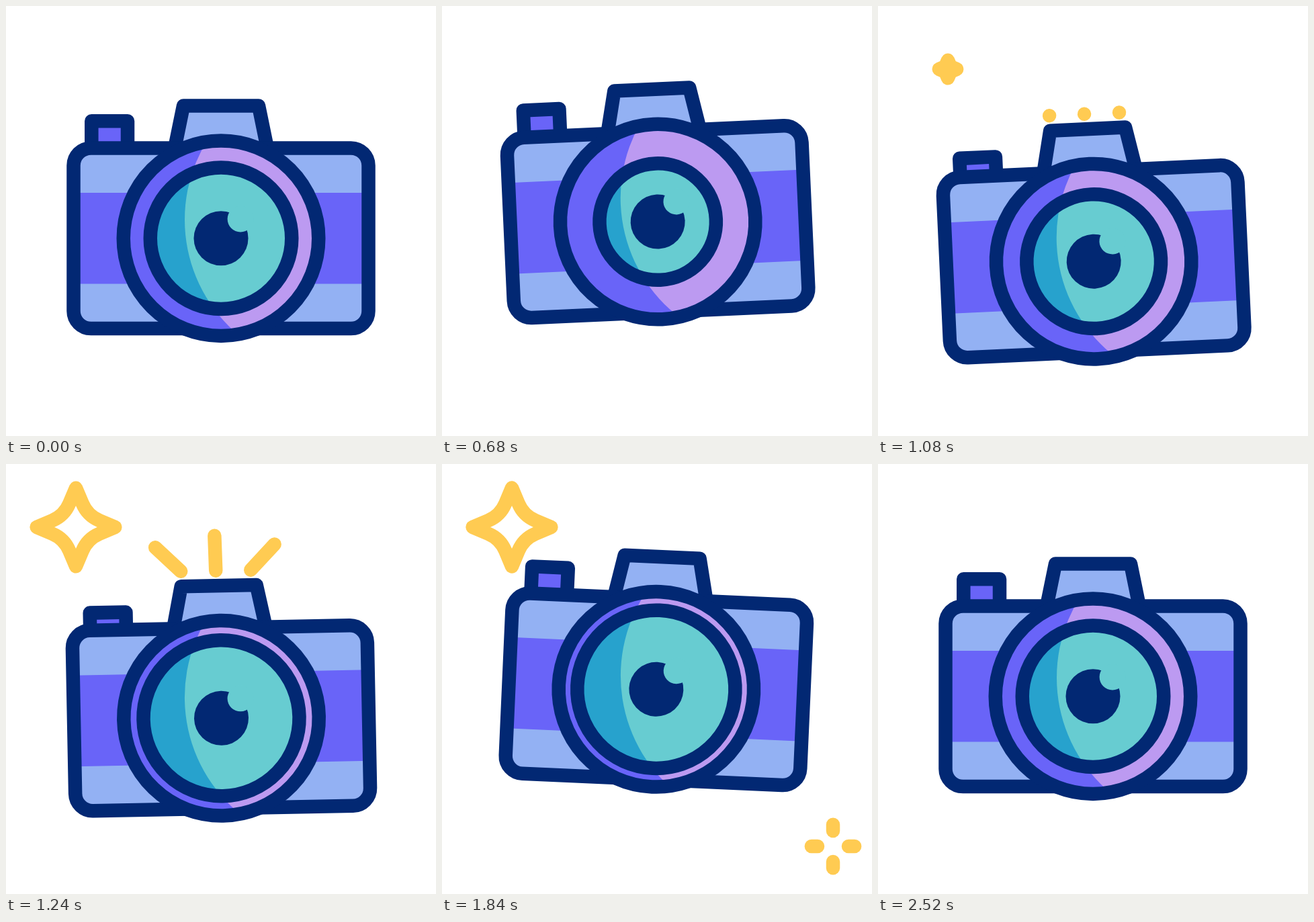
An HTML page with a canvas that plays this animation: 640x640 px, repeating every 3000 ms.

```html
<!DOCTYPE html>
<html lang="en">
<head>
<meta charset="utf-8">
<title>Camera</title>
<style>
html, body { margin: 0; width: 100%; height: 100%; overflow: hidden; background: #fff; }
canvas { display: block; width: 640px; height: 640px; }
</style>
</head>
<body>
<canvas id="stage" width="640" height="640"></canvas>
<script>
const ctx = document.getElementById('stage').getContext('2d');
const LOOP = 3000, BEAT = 333, STROKE = 20.5, DEG = Math.PI / 180;
const NAVY = '#022873', SKY = '#93b1f3', VIOLET = '#6964f8', PINK = '#bc9af1',
  TEAL = '#67ccd1', BLUE = '#27a2cd', YELLOW = '#ffcb52';

let t = 0;

// Eased 0 to 1 while the clock runs from a to b
function ramp(a, b, time = t) {
  const p = Math.min(1, Math.max(0, (time - a) / (b - a)));
  return p * p * (3 - 2 * p);
}

// Runs fn with its own transform and clip
function group(fn) {
  ctx.save();
  fn();
  ctx.restore();
}

function circle(x, y, r) {
  const path = new Path2D();
  path.arc(x, y, r, 0, 360 * DEG);
  return path;
}

function fill(path, color) {
  ctx.fillStyle = color;
  ctx.fill(path);
}

function outline(path) {
  ctx.strokeStyle = NAVY;
  ctx.stroke(path);
}

// A yellow upright stroke, measured outwards from the current origin
function spoke(from, to) {
  ctx.strokeStyle = YELLOW;
  ctx.beginPath();
  ctx.moveTo(0, -from);
  ctx.lineTo(0, -to);
  ctx.stroke();
}

const hump = new Path2D('M251 212L264 148.5H376L389 212Z');
const button = new Path2D('M127.3 215V171.3H181V215Z');
const body = new Path2D();
body.roundRect(100.5, 211.5, 439, 268.5, 26);
const shine = circle(490, 318, 224);

// A disc in shade colour, with the lit side cut by one large arc
function litDisc(r, shade, light) {
  const disc = circle(320, 345.75, r);
  group(() => {
    ctx.clip(disc);
    fill(disc, shade);
    fill(shine, light);
  });
  outline(disc);
}

function drawRays() {
  const tip = ramp(1080, 1230), root = ramp(1240, 1400);
  if (tip <= root) return;
  for (const side of [-1, 0, 1]) {
    group(() => {
      ctx.translate(316 + 52 * side, 126);
      ctx.rotate((45 * side - 1) * DEG);
      spoke(52 * root, 52 * tip);
    });
  }
}

function drawCamera() {
  // Rise, crouch, jump, then everything settles back to rest
  const settle = 1 - ramp(1740, 2480);
  const lift = settle * (-26 * ramp(200, 640) + 61 * ramp(640, 1107) - 46 * ramp(1174, 1651));
  const tilt = settle * (-3.2 * ramp(200, 867) + 5.9 * ramp(937, 1694));
  const iris = 105.25 + settle * (-18.5 * ramp(200, 680) + 31.5 * ramp(900, 1307));
  const press = 14 * (ramp(820, 1160) - ramp(1240, 1480));

  group(() => {
    ctx.translate(320, 320 + lift);
    ctx.rotate(tilt * DEG);
    ctx.translate(-320, -320);

    group(() => {
      ctx.translate(0, press);
      fill(button, VIOLET);
      outline(button);
    });
    fill(hump, SKY);
    outline(hump);
    fill(body, SKY);
    ctx.fillStyle = VIOLET;
    ctx.fillRect(100.5, 278, 439, 135.5);
    outline(body);

    litDisc(145.25, VIOLET, PINK);
    litDisc(iris, BLUE, TEAL);
    fill(circle(320, 345.75, 40.5), NAVY);
    fill(circle(349, 317, 19.4), TEAL);
    drawRays();
  });
}

// Grows for one beat, pulses for two, shrinks for one
function drawStar() {
  const beat = (t - 987) / BEAT, edge = Math.min(beat, 4 - beat);
  if (edge <= 0) return;
  const r = edge < 1 ? 68 * ramp(0, 1, edge) : 56 - 12 * Math.cos(Math.PI * beat);
  const near = r * 0.167, far = r * 0.604, knee = r * 0.296;
  group(() => {
    ctx.translate(104, 94);
    ctx.beginPath();
    for (let i = 0; i < 4; i++) {
      ctx.lineTo(0, -r);
      ctx.lineTo(near, -far);
      ctx.quadraticCurveTo(knee, -knee, far, -near);
      ctx.rotate(90 * DEG);
    }
    ctx.closePath();
    ctx.strokeStyle = YELLOW;
    ctx.stroke();
  });
}

function drawSparkle() {
  const size = 1 - ramp(1900, 2220);
  if (t <= 1300 || size === 0) return;
  const tip = 12 + 31 * ramp(1300, 1590) - 11 * ramp(1590, 1860);
  const root = 11 + 12 * ramp(1300, 1560);
  group(() => {
    ctx.translate(582, 569);
    for (let i = 0; i < 4; i++) {
      spoke(root * size, tip * size);
      ctx.rotate(90 * DEG);
    }
  });
}

const start = performance.now();
function tick() {
  t = (performance.now() - start) % LOOP;
  ctx.clearRect(0, 0, 640, 640);
  ctx.lineWidth = STROKE;
  ctx.lineCap = ctx.lineJoin = 'round';
  drawStar();
  drawCamera();
  drawSparkle();
  requestAnimationFrame(tick);
}
tick();
</script>
</body>
</html>
```
